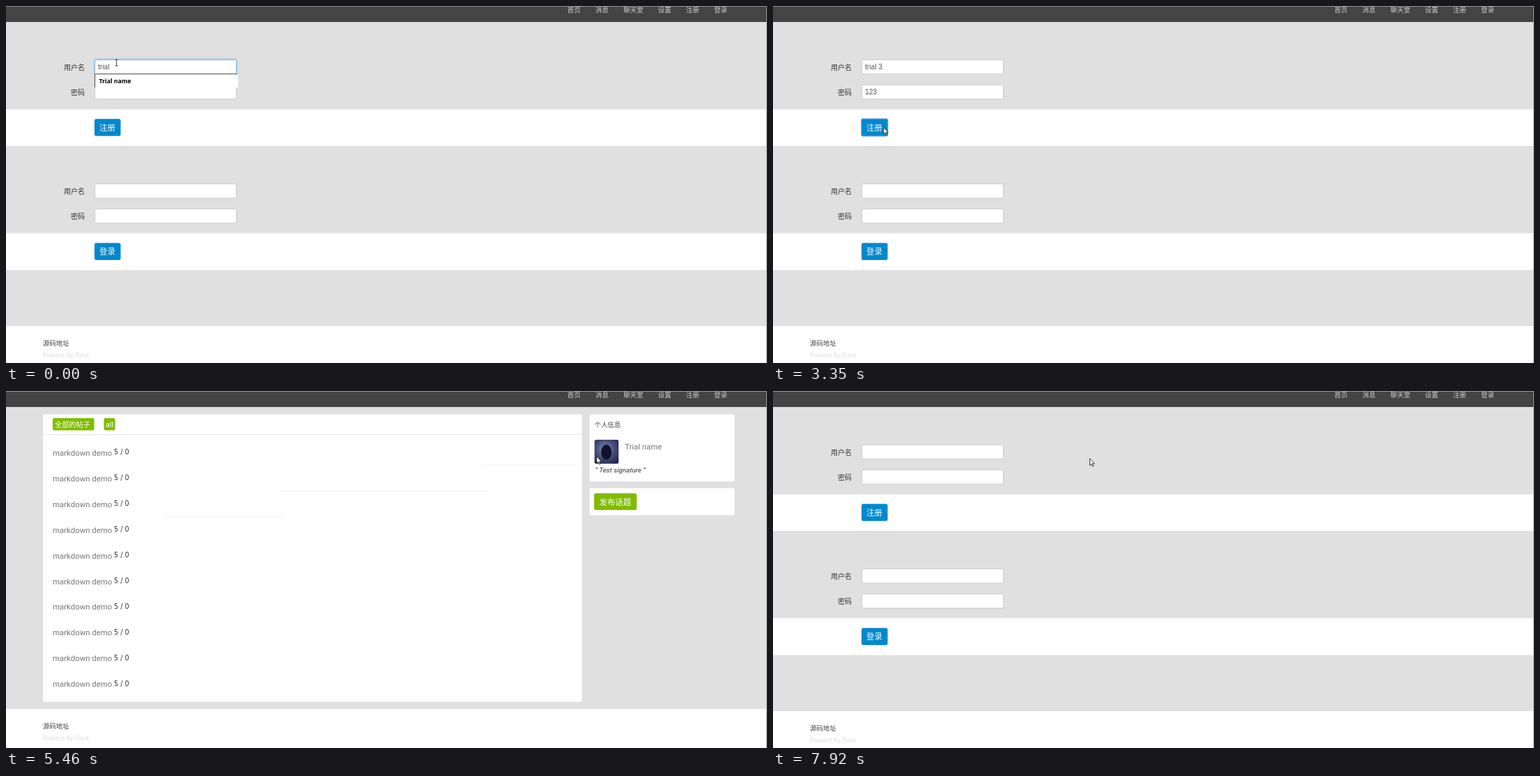
An HTML page that plays this animation: 1092 by 513 pixels, repeating every 8000 ms.

```html
<!DOCTYPE html>
<html lang="zh-CN">
<head>
<meta charset="utf-8">
<title>Forum sign-up</title>
<style>
  html, body { margin: 0; width: 100%; height: 100%; overflow: hidden; background: #e0e0e0; }
  svg { display: block; }
  text { font-family: "Noto Sans CJK SC", "Noto Sans CJK", sans-serif; font-size: 9.4px; fill: #444; white-space: pre; }
  .nav text { fill: #ccc; font-size: 9.5px; }
  .nav text.hover { fill: #fff; }
  .label { font-size: 10px; fill: #333; text-anchor: end; }
  .input { fill: #fff; stroke: #ccc; }
  .input.focus { stroke: #7ab8e8; filter: drop-shadow(0 0 1.5px #66afe9); }
  .value { font: 10.2px "Liberation Sans", Arial, sans-serif; fill: #555; }
  .hint { font: bold 8.7px "Open Sans", sans-serif; fill: #000; }
  .btn { fill: #08c; }
  .btn.focus { stroke: #4b93e0; stroke-width: 1.4; }
  .btn-text { font-size: 11.4px; fill: #fff; }
  .tag { fill: #80bd01; }
  .tag-text { font-size: 10.2px; fill: #fff; }
  .all { font: 10.7px Roboto, sans-serif; fill: #fff; }
  .latin { font: 11.4px Roboto, sans-serif; fill: #777; }
  .count { font: 9.6px "DejaVu Sans", sans-serif; fill: #333; }
  .sign { font: italic 9.9px Roboto, sans-serif; fill: #333; }
  .credit { font: 8.8px "Noto Sans", sans-serif; fill: #ddd; }
  .white { fill: #fff; }
  .trail { fill: #f4f4f4; }
</style>
</head>
<body>
<svg width="1092" height="513" viewBox="0 0 1092 513">
  <defs>
    <radialGradient id="sky" cx=".45" cy=".4" r=".75">
      <stop offset="0" stop-color="#8c94bb"/>
      <stop offset=".5" stop-color="#464e7c"/>
      <stop offset="1" stop-color="#1d2142"/>
    </radialGradient>
  </defs>
  <rect width="1092" height="513" fill="#e0e0e0"/>
  <rect width="1092" height="23" fill="#444"/>
  <g class="nav" id="nav"></g>

  <g id="login">
    <path class="white" d="M0 148.5H1092V201H0zM0 326.5H1092V379.5H0z"/>
    <g id="forms"></g>
    <g id="hint">
      <rect class="white" x="127" y="97" width="206" height="20"/>
      <path d="M127.5 117V97.7H332" fill="none" stroke="#444"/>
      <text class="hint" x="133.5" y="111">Trial name</text>
    </g>
    <text class="value" id="user" x="132" y="91"></text>
    <text class="value" id="pass" x="132" y="126.7"></text>
    <rect id="caret" width="1" height="12" fill="#222"/>
  </g>

  <g id="topics">
    <rect class="white" x="53" y="33.5" width="773.5" height="413" rx="2.5"/>
    <rect class="white" x="837.5" y="33.5" width="208" height="96.5" rx="2.5"/>
    <rect class="white" x="837.5" y="139.5" width="208" height="39" rx="2.5"/>
    <path class="trail" id="smear" d="M576 34H826.5V62H576zM838 34H1026V45H1023V62H838z"/>
    <rect x="53" y="62" width="773.5" height="1" fill="#e5e5e5"/>
    <rect class="tag" x="67" y="39" width="59.5" height="17.5" rx="2"/>
    <text class="tag-text" x="70" y="51.8">全部的帖子</text>
    <rect class="tag" x="140.5" y="39" width="16" height="17.5" rx="2"/>
    <text class="all" x="143" y="52">all</text>
    <g id="rows"></g>
    <g id="trails"></g>
    <text x="844.5" y="52">个人信息</text>
    <rect x="844.5" y="70" width="34.5" height="34.5" rx="2.5" fill="url(#sky)"/>
    <ellipse cx="861.5" cy="88" rx="7.5" ry="11" fill="#10132a"/>
    <text class="latin" x="888" y="83.5">Trial name</text>
    <text class="sign" x="845.5" y="117.3">“ Test signature ”</text>
    <rect class="tag" x="844" y="147" width="61" height="24" rx="2.5"/>
    <text class="btn-text" x="851.5" y="163.5">发布话题</text>
  </g>

  <g id="footer">
    <rect class="white" y="460" width="1092" height="60"/>
    <text x="53" y="487.5">源码地址</text>
    <text class="credit" x="53" y="505.3">Powerd By Flask</text>
  </g>
  <path d="M0 .5H1091.5V513" fill="none" stroke="#999"/>
  <g id="pointer">
    <path id="arrow" d="M.5 .5V10.3L2.8 8.2L4.5 11.8L6 11.1L4.4 7.7H7.4Z" fill="#fff" stroke="#222" stroke-width=".9"/>
    <path id="beam" d="M-2 -4.5H2M0 -4.5V4.5M-2 4.5H2" fill="none" stroke="#333" stroke-width=".9"/>
  </g>
</svg>
<script>
const LOOP = 8000, STEP = 145, PHASE = 85;
const $ = id => document.getElementById(id);

let menuX = 805.5;
for (const name of ["首页", "消息", "聊天室", "设置", "注册", "登录"]) {
  $("nav").innerHTML += `<text x="${menuX}" y="9.2">${name}</text>`;
  menuX += name.length * 9.5 + 21.2;
}
const loginLink = $("nav").lastChild;

const field = (label, id, y) =>
  `<text class="label" x="113" y="${y + 14.2}">${label}</text>
   <rect class="input" id="${id}" x="127.5" y="${y}" width="203" height="20.5" rx="2.5"/>`;
const form = (name, action, y) =>
  field("用户名", name + "User", y) + field("密码", name + "Pass", y + 36) +
  `<rect class="btn" id="${name}Btn" x="127" y="${y + 85}" width="37.5" height="24.5" rx="2.5"/>
   <text class="btn-text" x="134" y="${y + 101.3}">${action}</text>`;
$("forms").innerHTML = form("join", "注册", 77.3) + form("enter", "登录", 255.6);

for (let i = 0; i < 10; i++) {
  const y = 93 + i * 36.9;
  $("rows").innerHTML += `<text class="latin" x="67" y="${y}">markdown demo</text>
    <text class="count" x="155" y="${y - 1.6}">5 / 0</text>`;
}

// Each row divider the pointer sweeps past stays faintly visible
[225, 392, 683].forEach((x, i, xs) => {
  const end = (xs[i + 1] ?? 811) + 9;
  $("trails").innerHTML += `<rect class="trail" x="${x}" y="${180.5 - i * 37.25}" width="${end - x}" height="1"/>`;
});
const trails = [...$("trails").children];

// Turning points of the pointer: time, x, y
const path = [
  [950, 158.5, 81.5], [1360, 163, 123], [2000, 203, 175], [2400, 203, 166],
  [2695, 203, 166], [3300, 156, 174], [3600, 158, 175], [4145, 252, 205.5],
  [4290, 237.5, 193], [4725, 227, 190], [5015, 682, 108], [5160, 811, 96],
  [5450, 847, 93.5], [5880, 961, 72], [6175, 948, 75], [6940, 1017, 21],
  [7625, 1016, 30], [7770, 575.5, 88], [7915, 454, 96.5]
];

function pointerAt(t) {
  const s = Math.floor((t - PHASE) / STEP) * STEP + PHASE;
  const next = path.findIndex(p => p[0] > s);
  if (next === 0) return path[0].slice(1);
  if (next < 0) return path.at(-1).slice(1);
  const [t0, x0, y0] = path[next - 1], [t1, x1, y1] = path[next];
  const k = (s - t0) / (t1 - t0);
  return [x0 + (x1 - x0) * k, y0 + (y1 - y0) * k];
}

const within = (t, a, b) => t >= a && t < b;
const show = (el, on) => { el.style.display = on ? "" : "none"; };
const focus = (id, on) => $(id).classList.toggle("focus", on);

function draw(t) {
  const forum = within(t, 4300, 7920), reset = t >= 7920;
  show($("login"), !forum);
  show($("topics"), forum);
  $("footer").setAttribute("transform", `translate(0 ${forum ? -3 : 0})`);

  const typed = Math.max(0, Math.floor((t - 1885) / STEP));
  const pass = reset ? "" : "123".slice(0, typed);
  $("pass").textContent = pass;
  $("user").textContent = reset ? "" : t < 530 ? "trial" : "trial 3";
  show($("hint"), t < 530);

  const inUser = t < 1360;
  focus("joinUser", inUser);
  focus("joinPass", within(t, 1360, 3300));
  focus("joinBtn", within(t, 3300, 4300));
  show($("caret"), within(t, 130, 2700));
  $("caret").setAttribute("x", inUser ? (t < 530 ? 150 : 158) : 132.5 + pass.length * 5.7);
  $("caret").setAttribute("y", inUser ? 81 : 117);

  trails.forEach((el, i) => show(el, t >= 4880 + i * STEP));
  show($("smear"), t >= 7770);
  loginLink.classList.toggle("hover", within(t, 7090, 7920));

  const [x, y] = pointerAt(t);
  $("pointer").setAttribute("transform", `translate(${x.toFixed(1)} ${y.toFixed(1)})`);
  show($("beam"), t < 1630);
  show($("arrow"), t >= 1630);
}

function tick() {
  draw(performance.now() % LOOP);
  requestAnimationFrame(tick);
}
tick();
</script>
</body>
</html>
```
